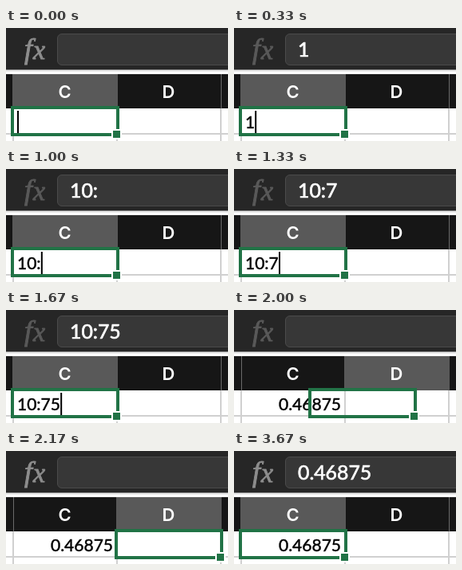
These frames come from a looping animation (278x142 px, 4.71 s). An HTML page:

```html
<!DOCTYPE html>
<html lang="en">
<head>
<meta charset="utf-8">
<title>Typing in a cell</title>
<style>
html, body { margin: 0; width: 100%; height: 100%; overflow: hidden; background: #fff; }
.stage { position: relative; width: 278px; height: 142px; overflow: hidden; background: #fff; }
.stage * { position: absolute; box-sizing: border-box; white-space: pre; }
.anim { animation: 4710ms step-end infinite; }

.bar { left: 0; top: 0; width: 278px; height: 52px; background: #262626; }
.rule { left: 0; top: 52px; width: 278px; height: 6px; background: linear-gradient(#8c8c8c 1px, #e9e9e9 1px 3px, #fff 3px); }
.field { left: 64px; top: 7px; width: 230px; height: 40px; border: 1px solid #4b4b4b; border-radius: 6px; background: #373737; }
.fx { left: 0; top: 0; font: italic 36px/36px "Liberation Serif", serif; -webkit-text-stroke: .9px; color: #8d8d8d; animation-name: fx; }

.head { left: 0; top: 58px; width: 278px; height: 43px; background: #161616; }
.sep { top: 58px; width: 1px; height: 43px; background: #6a6a6a; }
.on { top: 58px; width: 132px; height: 43px; background: #595959; }
.c { left: 8px; animation-name: headC; }
.d { left: 138px; animation-name: headD; }
.label { top: 58px; width: 131px; color: #fff; text-align: center; font: 600 22px/44px Inter, sans-serif; }
.grid { background: #d0d0d0; }
.v { top: 101px; width: 2px; height: 41px; }
.h { left: 0; top: 132px; width: 278px; height: 2px; }

.num { font-family: Lato, Carlito, sans-serif; font-kerning: none; }
.small { font-size: 21px; line-height: 30px; top: 103px; color: #000; -webkit-text-stroke: .45px; }
.big { font-size: 24.8px; line-height: 36px; top: 9px; left: 80px; color: #fff; -webkit-text-stroke: .7px; }
.typed { overflow: hidden; width: 0; animation-name: type; }
.entry { left: 14px; height: 30px; }
.formula { height: 36px; }
.caret { left: 14px; top: 104px; width: 2px; height: 28px; background: #000; font-size: 21px; animation-name: caret; }
.value { right: 144px; animation-name: value; }
.result { animation-name: result; }

.sel { left: 6px; top: 98px; width: 136px; height: 38px; border: 4px solid #217346; animation-name: move; }
.knob { right: -7px; bottom: -8px; width: 13px; height: 13px; background: #217346; border: 2px solid #fff; }

@keyframes type {
  0% { width: 0; }
  7.006% { width: .58em; }
  14.225% { width: 1.16em; }
  21.231% { width: 1.42em; }
  28.237% { width: 2em; }
  35.456% { width: 2.62em; }
  42.462%, 100% { width: 0; }
}
@keyframes caret {
  0% { transform: none; }
  7.006% { transform: translateX(.58em); }
  14.225% { transform: translateX(1.16em); }
  21.231% { transform: translateX(1.42em); }
  28.237% { transform: translateX(2em); }
  35.456% { transform: translateX(2.58em); opacity: 1; }
  42.462%, 100% { opacity: 0; }
}
@keyframes value { 0% { opacity: 0; } 42.462%, 100% { opacity: 1; } }
@keyframes result { 0% { opacity: 0; } 77.919%, 100% { opacity: 1; } }
@keyframes headC { 0% { opacity: 1; } 42.462% { opacity: 0; } 77.919%, 100% { opacity: 1; } }
@keyframes headD { 0% { opacity: 0; } 42.462% { opacity: 1; } 77.919%, 100% { opacity: 0; } }
@keyframes fx { 0% { color: #8d8d8d; } 7.006% { color: #595959; } 46.072%, 100% { color: #8d8d8d; } }
@keyframes move {
  0% { transform: none; }
  42.462% { transform: translateX(87px); }
  43.312% { transform: translateX(107px); }
  44.161% { transform: translateX(120px); }
  45.01% { transform: translateX(127px); }
  46.072% { transform: translateX(130px); }
  77.919%, 100% { transform: none; }
}
</style>
</head>
<body>
<div class="stage">
  <div class="bar"></div>
  <div class="fx anim"><span style="left:23px;top:8px">f</span><span style="left:34px;top:10px;font-size:34px">x</span></div>
  <div class="field"></div>
  <div class="rule"></div>

  <div class="grid h"></div>
  <div class="grid v" style="left:8px"></div>
  <div class="grid v" style="left:138px"></div>
  <div class="grid v" style="left:268px"></div>

  <div class="head"></div>
  <div class="sep" style="left:9px"></div>
  <div class="sep" style="left:139px"></div>
  <div class="sep" style="left:269px"></div>
  <div class="on c anim"></div>
  <div class="on d anim"></div>
  <div class="label" style="left:8px">C</div>
  <div class="label" style="left:138px">D</div>

  <div class="num big formula typed anim">10:75</div>
  <div class="num big result anim">0.46875</div>
  <div class="num small entry typed anim">10:75</div>
  <div class="num small value anim">0.46875</div>
  <div class="caret anim"></div>
  <div class="sel anim"><div class="knob"></div></div>
</div>
</body>
</html>
```
